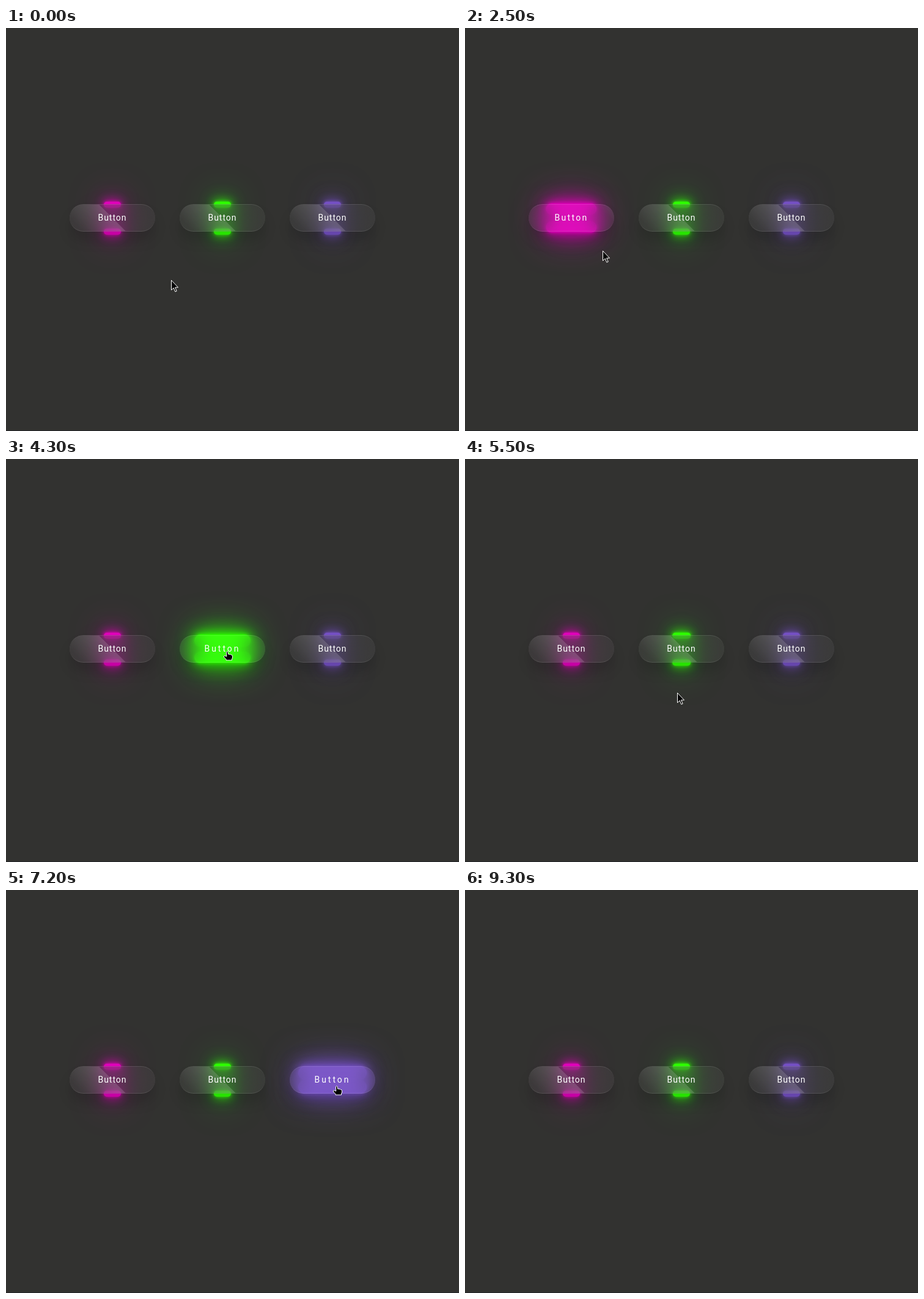
These frames come from a looping animation (741 by 659 pixels, 9800 ms). An HTML page:

```html
<!DOCTYPE html>
<html lang="en">
<head>
<meta charset="utf-8">
<title>Glowing glass buttons</title>
<style>
  html, body { margin: 0; width: 100%; height: 100%; overflow: hidden; background: #323230; }
  body::after { content: ""; position: absolute; left: 0; right: 0; bottom: 0; height: 1px; background: #252629; }
  .btn { position: absolute; top: 288px; width: 140px; height: 45px; }
  .bar {
    position: absolute; left: 50%; transform: translateX(-50%);
    background: var(--c);
    box-shadow: 0 0 5px var(--c), 0 0 15px var(--c), 0 0 30px var(--c), 0 0 60px var(--c);
  }
  .glass {
    position: absolute; inset: 0; box-sizing: border-box; overflow: hidden;
    display: flex; justify-content: center; align-items: center;
    border: solid rgba(255, 255, 255, .1); border-width: 1px 0; border-radius: 30px;
    background: rgba(255, 255, 255, .05);
    box-shadow: 0 15px 20px rgba(0, 0, 0, .13);
    -webkit-backdrop-filter: blur(15px); backdrop-filter: blur(15px);
    color: #fff; font: 14px Roboto, sans-serif;
  }
  .sheen {
    position: absolute; left: 0; top: 0; width: 50%; height: 100%;
    background: linear-gradient(to left, rgba(255, 255, 255, .15), transparent);
  }
  .label { position: relative; top: -1px; white-space: nowrap; }
  #cursor { position: absolute; left: 0; top: 0; width: 1px; height: 1px; overflow: visible; z-index: 2; }
  #cursor path { fill: #000; stroke: #fff; stroke-width: 1; stroke-linejoin: round; }
</style>
</head>
<body>
<svg id="cursor">
  <path id="arrow" d="M.5 .5V16.5L4.2 13L6.8 19.2L9.2 18.2L6.6 12.2H11.5Z"/>
  <path id="hand" d="M-.5 1.5Q.8 -.5 2 1.5L2.6 5.3Q4 4.6 5 5.7Q6.6 5.2 7.4 6.4Q9.5 6.2 9.5 8.2V11L8.5 13V15H-1V13.5L-4.5 10Q-5 7.6-3.2 7.6L-.2 9Z"/>
</svg>
<script>
const LOOP = 9800, STEP = 100, FADE = 500, DELAY = 500;

const buttons = [
  { color: '#e100bb', enter: 810, leave: 2390 },
  { color: '#2eff00', enter: 3570, leave: 5090 },
  { color: '#7550c4', enter: 6230, leave: 7490 }
];

// Pointer moves: each starts where the last one ended; sag bends the path down
const home = { x: 270, y: 412 };
const moves = [
  { from: 500, to: 920, x: 188, y: 316, sag: 0 },
  { from: 2300, to: 3300, x: 336, y: 372, sag: 45 },
  { from: 3300, to: 3770, x: 361, y: 314, sag: 0 },
  { from: 4990, to: 5500, x: 347, y: 382, sag: 0 },
  { from: 5500, to: 5900, x: 508, y: 385, sag: 10 },
  { from: 6000, to: 6320, x: 540, y: 320, sag: 0 },
  { from: 7420, to: 8650, x: 92, y: 311, sag: 88 },
  { from: 8700, to: 9000, x: 93, y: 44, sag: 0 },
  { from: 9100, to: 9300, x: 77, y: -24, sag: 0 }
];

const mix = (a, b, p) => a + (b - a) * p;
const clamp = v => Math.min(1, Math.max(0, v));
const bezier = (a, b, s) => 3 * a * s * (1 - s) ** 2 + 3 * b * s * s * (1 - s) + s ** 3;
const glide = v => 1 - (1 - v) ** 1.3;

// CSS "ease"
function ease(v) {
  v = clamp(v);
  let lo = 0, hi = 1;
  for (let i = 0; i < 24; i++) {
    const mid = (lo + hi) / 2;
    if (bezier(.25, .25, mid) < v) lo = mid; else hi = mid;
  }
  return bezier(.1, 1, lo);
}

function add(parent, name) {
  const el = document.createElement('div');
  el.className = name;
  return parent.appendChild(el);
}

buttons.forEach((b, i) => {
  const root = add(document.body, 'btn');
  root.style.left = 104 + 180 * i + 'px';
  root.style.setProperty('--c', b.color);
  b.bars = ['bottom', 'top'].map(side => ({ side, el: add(root, 'bar') }));
  const glass = add(root, 'glass');
  b.sheen = add(glass, 'sheen');
  b.label = add(glass, 'label');
  b.label.textContent = 'Button';
});

function hover(b, t, delay) {
  return t < b.leave
    ? ease((t - b.enter - delay) / FADE)
    : 1 - ease((t - b.leave) / FADE);
}

function drawButton(b, t) {
  const p = hover(b, t, 0), grow = hover(b, t, DELAY);
  b.label.style.letterSpacing = mix(1, 3, p) + 'px';
  b.sheen.style.transform = `skewX(45deg) translateX(${200 * p}px)`;
  for (const { side, el } of b.bars) {
    el.style[side] = (side === 'top' ? -4 : -5) * (1 - grow) + 'px';
    el.style.width = mix(28, 112, grow) + 'px';
    el.style.height = mix(10, 22.5, grow) + 'px';
    el.style.borderRadius = mix(10, 30, grow) + 'px';
  }
}

function pointAt(t) {
  let { x, y } = home;
  for (const m of moves) {
    if (t <= m.from) break;
    const p = glide(clamp((t - m.from) / (m.to - m.from)));
    x = mix(x, m.x, p);
    y = mix(y, m.y, p) + m.sag * 4 * p * (1 - p);
  }
  return [Math.round(x), Math.round(y)];
}

const cursor = document.getElementById('cursor');
const arrow = document.getElementById('arrow');
const hand = document.getElementById('hand');

function draw(t) {
  buttons.forEach(b => drawButton(b, t));
  const [x, y] = pointAt(t);
  const over = buttons.some(b => t >= b.enter && t < b.leave);
  cursor.style.transform = `translate(${x}px, ${y}px)`;
  arrow.style.display = over ? 'none' : '';
  hand.style.display = over ? '' : 'none';
}

const start = performance.now();
function tick() {
  const t = (performance.now() - start) % LOOP;
  draw(Math.floor(t / STEP) * STEP);
  requestAnimationFrame(tick);
}
tick();
</script>
</body>
</html>
```
